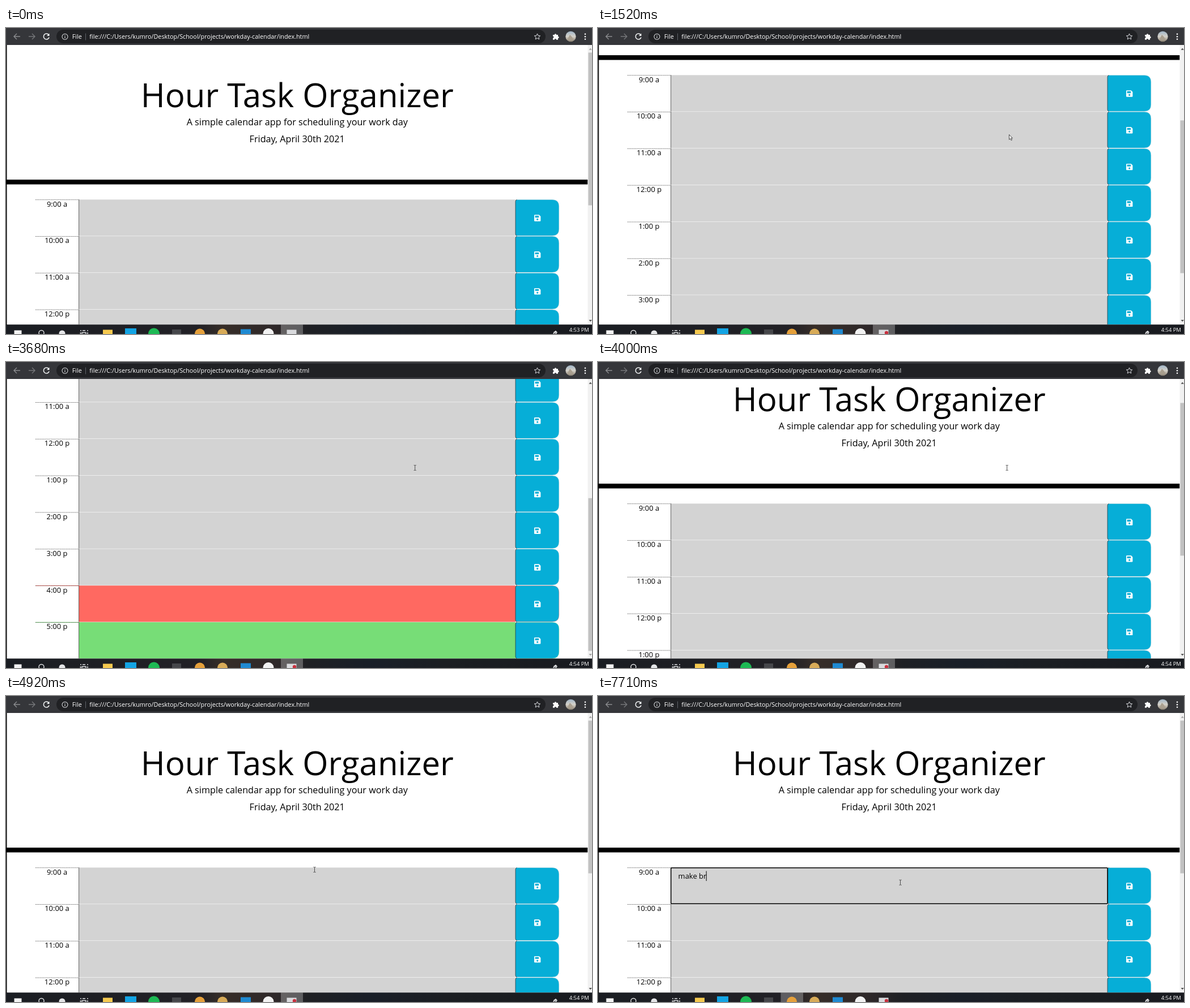
Recreate the animation shown at these times as an HTML page. Size 1034 by 541 pixels, loop 8000 ms.

```html
<!DOCTYPE html>
<html lang="en">
<head>
<meta charset="utf-8">
<title>Scheduler demo</title>
<style>
  html, body { margin: 0; width: 100%; height: 100%; overflow: hidden; background: #fff; }
  svg { display: block; width: 1034px; height: 541px; font-family: "Open Sans", sans-serif; }
  .mid { text-anchor: middle; }
  .line { fill: none; stroke-width: 1.4; }
  .hair { fill: none; stroke: #000; stroke-width: .6; }
</style>
</head>
<body>
<svg viewBox="0 0 1034 541">
  <defs>
    <clipPath id="view"><rect x="1" y="30" width="1025.500" height="494.3"/></clipPath>
    <linearGradient id="bar">
      <stop offset="0" stop-color="#1a1d22"/>
      <stop offset=".33" stop-color="#222126"/>
      <stop offset=".37" stop-color="#362d28"/>
      <stop offset=".46" stop-color="#2e2829"/>
      <stop offset=".52" stop-color="#1e2024"/>
      <stop offset=".62" stop-color="#191f28"/>
      <stop offset=".75" stop-color="#1b1e22"/>
      <stop offset="1" stop-color="#181a1f"/>
    </linearGradient>
    <linearGradient id="photo" x2="0" y2="1">
      <stop offset="0" stop-color="#9fb4c6"/>
      <stop offset=".5" stop-color="#d5d2ca"/>
      <stop offset="1" stop-color="#8c8272"/>
    </linearGradient>
  </defs>

  <rect width="1034" height="541" fill="#fff"/>

  <g clip-path="url(#view)">
    <g id="page">
      <g class="mid">
        <text x="513.8" y="139.5" font-size="58.1">Hour Task Organizer</text>
        <text x="513.8" y="172.2" font-size="16.2">A simple calendar app for scheduling your work day</text>
        <text x="513.7" y="201.5" font-size="16.2">Friday, April 30th 2021</text>
      </g>
      <rect x="1" y="268.1" width="1026" height="8.4"/>
      <g id="rows"></g>
      <rect id="focus" x="128.7" y="303.8" width="770.5" height="63.4" rx="1.5" fill="none" stroke="#000" stroke-width="1.5"/>
      <text id="typed" x="141.6" y="323.2" font-size="12.96" xml:space="preserve"></text>
      <rect id="caret" y="309.5" width="1" height="17.5"/>
    </g>
  </g>

  <!-- scrollbar -->
  <rect x="1026.500" y="30" width="7.500" height="494" fill="#f1f1f1"/>
  <rect id="thumb" x="1027.500" width="6.500" height="270" fill="#c1c1c1"/>
  <path id="up" d="M1028.500 38.800l2.700-3.200 2.700 3.200z"/>
  <path id="down" d="M1028.500 516l2.700 3.200 2.700-3.200z"/>

  <!-- browser toolbar -->
  <rect width="1034" height="30" fill="#35363a"/>
  <rect x="89" y="3" width="863" height="24" rx="12" fill="#202124"/>
  <g class="line">
    <path d="M25 15H14.500M19 10l-5 5 5 5" stroke="#8b8c8f"/>
    <path d="M40 15h10.500M46 10l5 5-5 5" stroke="#76777a"/>
    <path d="M75.300 12a5 5 0 1 0 .8 4.500" stroke="#f1f3f4" stroke-width="1.600"/>
    <path d="M76.500 9.500v4.500h-4.500z" fill="#f1f3f4"/>
    <circle cx="104" cy="15.300" r="5" stroke="#d4d6d9" stroke-width="1.100"/>
    <path d="M104 14.500v3.500M104 12v1.300" stroke="#d4d6d9" stroke-width="1.200"/>
    <path d="M140.500 9.500v12" stroke="#5f6368" stroke-width="1"/>
    <path d="M937.500 10l1.500 3.500 3.700.3-2.800 2.500.9 3.700-3.300-2-3.300 2 .9-3.700-2.800-2.500 3.700-.3z" stroke="#dadce0" stroke-width="1"/>
  </g>
  <g font-size="10.8" fill="#fff">
    <text x="116.700" y="19.200">File</text>
    <text x="147.300" y="19.200">file:///C:/Users/kumro/Desktop/School/projects/workday-calendar/index.html</text>
    <path d="M965 12h2.800a1.700 1.700 0 1 1 3.400 0h2.800v2.800a1.700 1.700 0 1 1 0 3.400v2.500h-3a1.600 1.600 0 0 0-3.200 0h-2.800v-3a1.600 1.600 0 0 0 0-3.200z"/>
    <circle cx="1022" cy="10.800" r="1.300"/><circle cx="1022" cy="15.300" r="1.300"/><circle cx="1022" cy="19.800" r="1.300"/>
  </g>
  <circle cx="996.500" cy="15" r="9.200" fill="url(#photo)"/>
  <path d="M990 21l5-9 3 3 4 6z" fill="#a99f8f"/>

  <!-- taskbar -->
  <rect y="524.300" width="1034" height="17" fill="url(#bar)"/>
  <rect id="browserTile" x="322.500" y="524.300" width="39.500" height="17" fill="#fff"/>
  <rect id="recorderTile" x="485" y="524.300" width="39" height="17" fill="#fff" opacity=".27"/>
  <g id="icons"></g>
  <g class="line" stroke="#e4e5e7" stroke-width="1.100">
    <circle cx="62.500" cy="539" r="4.500"/>
    <path d="M131 535h2M135 535h5M131.500 538v3M134 541v-2.500h7v2.500M144 534v2M144 538v3"/>
    <path d="M966 541l1-3 3-2 2 2-2 3M968 540l3-4"/>
  </g>
  <circle id="record" cx="509" cy="539" r="3.200" fill="#c9303e"/>
  <text id="clock" x="993.700" y="537" font-size="9.400" fill="#fff"></text>
  <rect y="30" width="1.500" height="495"/>

  <path id="arrow" d="M.5.500v8.800l2-1.900 1.500 3.200 1.500-.7-1.500-3.100h2.400z" fill="#fff" stroke="#222" stroke-width=".8"/>
  <path id="beam" d="M-2-4.500h1.500l.5.500.5-.5h1.500M0-4v8M-2 4.500h1.500l.5-.5.500.5h1.500" fill="none" stroke="#3c3c3c" stroke-width=".9"/>
</svg>

<script>
const LOOP = 8000, TOP = 302.75, PITCH = 64.82;
const $ = id => document.getElementById(id);

const past = '#d3d3d3', present = '#ff6961', future = '#77dd77';
const hours = ['9:00 a', '10:00 a', '11:00 a', '12:00 p', '1:00 p', '2:00 p', '3:00 p', '4:00 p', '5:00 p'];

function row(label, i) {
  const color = i < 7 ? past : i === 7 ? present : future;
  const dashTint = i < 7 ? 'none' : color;
  return `<g transform="translate(0 ${TOP + i * PITCH})">
    <rect x="128.800" y=".55" width="770" height="64.270" fill="${color}"/>
    <path d="M52 .8H128.800" stroke="${dashTint}" stroke-width=".9"/>
    <path class="hair" d="M52 .9H128.800" stroke-dasharray="1.600 1.100"/>
    <path class="hair" d="M128.600 .55V64.800"/>
    <text class="mid" x="90" y="12.900" font-size="12.960">${label}</text>
    <path d="M902 .8H963.800q12 0 12 12v39.700q0 12-12 12H902q-3.100 0-3.100-3.100V3.900q0-3.100 3.100-3.100z" fill="#06aed7" stroke="${color}" stroke-width=".4"/>
    <path class="hair" d="M901.500 .8q-2.500 0-2.500 3.100v57.500q0 3.100 2.500 3.100"/>
    <path transform="translate(937.700 33.200)" fill="#fff" fill-rule="evenodd"
      d="M-5.700-4.500q0-1.200 1.200-1.200h7.400l2.800 2.800v7.400q0 1.200-1.200 1.200h-9q-1.200 0-1.200-1.200zM-4.100-4.100v3.300h6.500v-3.300zM0 .8a1.630 1.630 0 1 0 .01 0z"/>
  </g>`;
}
$('rows').innerHTML = hours.map(row).join('');

const square = (x, y, w, fill) => `<rect x="${x}" y="${y}" width="${w}" height="${w}" fill="${fill}"/>`;
const disc = (x, y, r, fill) => `<circle cx="${x}" cy="${y}" r="${r}" fill="${fill}"/>`;
$('icons').innerHTML =
  square(14.5, 534.5, 13, '#f4f4f4') + disc(99, 540, 5.5, '#e4e5e7') +
  square(171, 533.5, 17, '#f5c94f') + square(210, 531, 20, '#13a4e4') +
  disc(261, 540.5, 10, '#1db954') + square(293, 533, 16, '#46474b') +
  disc(342, 540.5, 9, '#e5a03b') + disc(382, 540.5, 9, '#d8ab58') +
  square(414, 532.5, 18, '#1f8ad2') + disc(463, 540.5, 9.5, '#f2f2f2') +
  square(495.5, 533.5, 17, '#d9dadd');

// time, scroll offset, pointer shape, pointer x, pointer y
const steps = [
  [0, 0, '', 0, 0],
  [260, 0, 'arrow', 663, 169],
  [580, 0, 'arrow', 725, 188],
  [1220, 65.3, 'arrow', 725, 188],
  [1520, 220, 'arrow', 725, 188],
  [1830, 361, 'arrow', 725, 188],
  [2140, 361.8, 'arrow', 721, 182],
  [2440, 361.8, 'beam', 723, 187],
  [3380, 361.8, 'beam', 722, 186.5],
  [3680, 361.8, 'beam', 721.7, 187],
  [4000, 53, 'beam', 721.7, 187],
  [4310, 27.5, 'beam', 721.7, 187],
  [4620, 0, 'arrow', 576, 290],
  [4920, 0, 'beam', 544.5, 307],
  [5230, 0, 'beam', 536.5, 330],
  [5550, 0, 'beam', 533.5, 329.7]
];
const typing = [[0, ''], [6790, 'make'], [7100, 'make '], [7400, 'make b'], [7710, 'make br']];

const at = (list, t) => list.findLast(entry => entry[0] <= t);
const show = (id, on) => $(id).setAttribute('visibility', on ? 'visible' : 'hidden');

function draw() {
  const t = performance.now() % LOOP;
  const [, scroll, shape, x, y] = at(steps, t);
  const focused = t >= 5230;

  $('page').setAttribute('transform', `translate(0 ${-scroll})`);
  $('thumb').setAttribute('y', 43.5 + scroll * 0.545);
  $('up').setAttribute('fill', scroll ? '#505050' : '#a3a3a3');
  $('down').setAttribute('fill', scroll > 361.5 ? '#a3a3a3' : '#505050');

  for (const id of ['arrow', 'beam']) {
    show(id, shape === id);
    $(id).setAttribute('transform', `translate(${x} ${y})`);
  }

  const typed = $('typed'), text = at(typing, t)[1];
  if (typed.textContent !== text) typed.textContent = text;
  $('caret').setAttribute('x', 141 + (text ? typed.getComputedTextLength() : 0));
  show('caret', focused && (t < 5880 || t >= 6480));
  show('focus', focused);

  show('record', t >= 260);
  show('recorderTile', !focused);
  $('browserTile').setAttribute('opacity', t < 5230 ? 0 : t < 5550 ? 0.18 : 0.27);
  $('clock').textContent = t < 1520 ? '4:53 PM' : '4:54 PM';
  requestAnimationFrame(draw);
}
draw();
</script>
</body>
</html>
```
